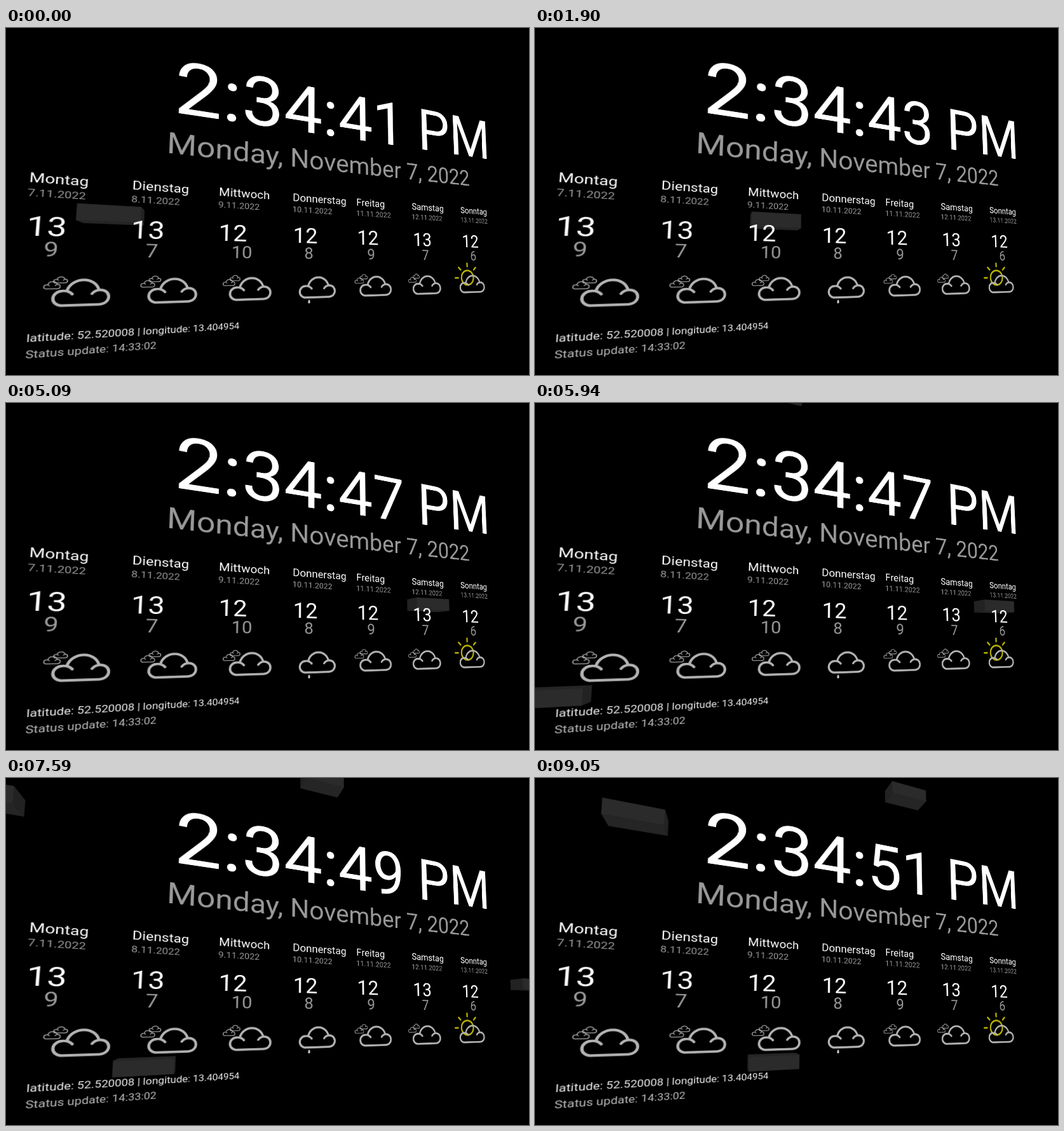
Animation, 823 px wide and 546 px high, one loop 9150 ms. Source, as an HTML page with a canvas:

```html
<!DOCTYPE html>
<html lang="en">
<head>
<meta charset="utf-8">
<title>Tilted clock and forecast</title>
<style>
html, body { margin: 0; width: 100%; height: 100%; overflow: hidden; background: #000; }
#stage { position: relative; width: 100%; height: 100%; overflow: hidden; contain: strict; }
canvas, svg { position: absolute; left: 0; }
canvas { top: 0; }
/* The wall: x runs along the forecast row, y = 0 is the horizon */
svg {
  top: -420px;
  transform-origin: 0 420px;
  transform: matrix3d(1.3348, .2642, 0, .0007008, -.085, .9359, 0, -.00017, 0, 0, 1, 0, 25.2, 377, 0, 1);
  font-family: Roboto, sans-serif;
}
text { white-space: pre; }
path, circle { fill: none; stroke: #b4b4b4; stroke-width: 4.2; stroke-linecap: round; }
.sun { stroke: #b8b000; }
.drop { fill: #ccc; stroke: none; }
</style>
</head>
<body>
<div id="stage">
<canvas width="823" height="546"></canvas>
<svg width="1100" height="600" viewBox="0 -420 1100 600"></svg>
</div>
<script>
const LOOP = 9150;
const svg = document.querySelector('svg');
const ctx = document.querySelector('canvas').getContext('2d');

function add(tag, attrs, parent = svg) {
  const el = document.createElementNS('http://www.w3.org/2000/svg', tag);
  for (const key in attrs) el.setAttribute(key, attrs[key]);
  return parent.appendChild(el);
}

function label(str, x, y, size, fill = '#fff') {
  const el = add('text', { x, y, 'font-size': size, fill });
  el.textContent = str;
  return el;
}

const CLOUD = 'M13 44A11.8 11.8 0 0 1 14 20.5Q22 20 27 26M20 20A21.5 21.5 0 0 1 62 20' +
  'M53 26Q57 20 64 20A12 12 0 0 1 64 44H13';

function smallCloud(parent, x, y, scale) {
  add('path', {
    d: CLOUD,
    transform: `translate(${x} ${y}) scale(${scale})`,
    style: `stroke-width:${1.2 / scale}`
  }, parent);
}

function icon(kind, x) {
  const g = add('g', { transform: `translate(${x} 17.3)` });
  if (kind === 'sun') {
    add('circle', { class: 'sun', cx: 25.5, cy: 8, r: 18 }, g);
    for (let a = 180; a <= 315; a += 45) {
      add('path', { class: 'sun', d: 'M28 0H36', transform: `translate(25.5 8) rotate(${a})` }, g);
    }
  }
  if (kind === 'clouds') {
    smallCloud(g, -10.5, 4.5, .28);
    smallCloud(g, 1.5, -3, .24);
  }
  if (kind === 'rain') add('path', { class: 'drop', d: 'M21.8 48C14 59 29 59 21.8 48' }, g);
  add('path', { d: CLOUD }, g);
}

const clock = label('', 197, -290, 146.6);
label('Monday, November 7, 2022', 188.4, -210.6, 56.2, '#999');

[
  ['Montag', 13, 9, 'clouds'],
  ['Dienstag', 13, 7, 'clouds'],
  ['Mittwoch', 12, 10, 'clouds'],
  ['Donnerstag', 12, 8, 'rain'],
  ['Freitag', 12, 9, 'clouds'],
  ['Samstag', 13, 7, 'clouds'],
  ['Sonntag', 12, 6, 'sun']
].forEach(([day, high, low, kind], i) => {
  const x = 139 * i;
  label(day, x, -138, 22.5);
  label(`${7 + i}.11.2022`, x - .5, -115.5, 16.8, '#999');
  label(high, x + 1.3, -51, 45.2);
  label(low, x + 24.5, -17.6, 33.6, '#999');
  icon(kind, 38 + 130.7 * i);
});

label('latitude: 52.520008 | longitude: 13.404954', 12, 116.3, 16.45, '#eee');
label('Status update: 14:33:02', 12.3, 141.3, 16.5, '#bbb');

// Boxes gliding along the wall: near top-left corner (x, y) at time t0,
// relative length, and distance growth as a polynomial in seconds
const BOXES = [
  { x: 112, y: 276, t0: 0, len: .0597, v: [.0721, .00315, -.000195] },
  { x: 46, y: 450, t0: 6.6, len: .063, v: [.0707, .00205, 0] },
  { x: 562, y: 5, t0: 9.05, len: .041, v: [.0428, 0, 0] },
  { x: 106, y: 31, t0: 9.05, len: .058, v: [.0745, .0013, 0] }
];
const ALONG = 1905, INWARD = 300, HORIZON = 377;

function drawBox({ x, y, t0, len, v }, time) {
  const s = time - t0;
  const dist = 1 + s * (v[0] + s * (v[1] + s * v[2]));
  const height = 440 * len, depth = 1.07 * len;

  // a: along the wall, b: down, c: into the wall, each 0 or 1
  const corner = ([a, b, c]) => {
    const w = dist + a * len + c * depth;
    const px = (ALONG * (dist + a * len) - ALONG + x + INWARD * c * depth) / w;
    const drop = b * height / w;
    return [px + drop * (px - 500) / 5900, HORIZON + (y - HORIZON) / w + drop];
  };
  const face = (color, ...corners) => {
    ctx.fillStyle = ctx.strokeStyle = color;
    ctx.beginPath();
    corners.forEach(p => ctx.lineTo(...corner(p)));
    ctx.closePath();
    ctx.fill();
    ctx.stroke();
  };

  const b = y < HORIZON ? 1 : 0;
  face('#252525', [0, b, 0], [1, b, 0], [1, b, 1], [0, b, 1]);
  for (const a of [0, 1]) {
    const shown = a ? corner([1, 0, 0])[0] < INWARD : corner([0, 0, 0])[0] > INWARD;
    if (shown) face('#222', [a, 0, 0], [a, 1, 0], [a, 1, 1], [a, 0, 1]);
  }
  face('#2b2b2b', [0, 0, 0], [1, 0, 0], [1, 1, 0], [0, 1, 0]);
}

// The picture advances in small steps, eight between each pair of marks
const MARKS = [130, 1220, 2300, 3370, 4420, 5520, 6600, 7710, 8780, 9860];

function snap(ms) {
  const i = MARKS.findLastIndex(m => m <= ms);
  if (i < 0) return 0;
  const step = (MARKS[i + 1] - MARKS[i]) / 8;
  return MARKS[i] + step * Math.floor((ms - MARKS[i]) / step + .15);
}

ctx.lineWidth = .5;

function frame() {
  const time = snap(performance.now() % LOOP) / 1000;
  const text = `2:34:${Math.floor(41.96 + time)} PM`;
  if (clock.textContent !== text) clock.textContent = text;
  ctx.clearRect(0, 0, 823, 546);
  BOXES.forEach(box => drawBox(box, time));
  requestAnimationFrame(frame);
}
frame();
</script>
</body>
</html>
```
